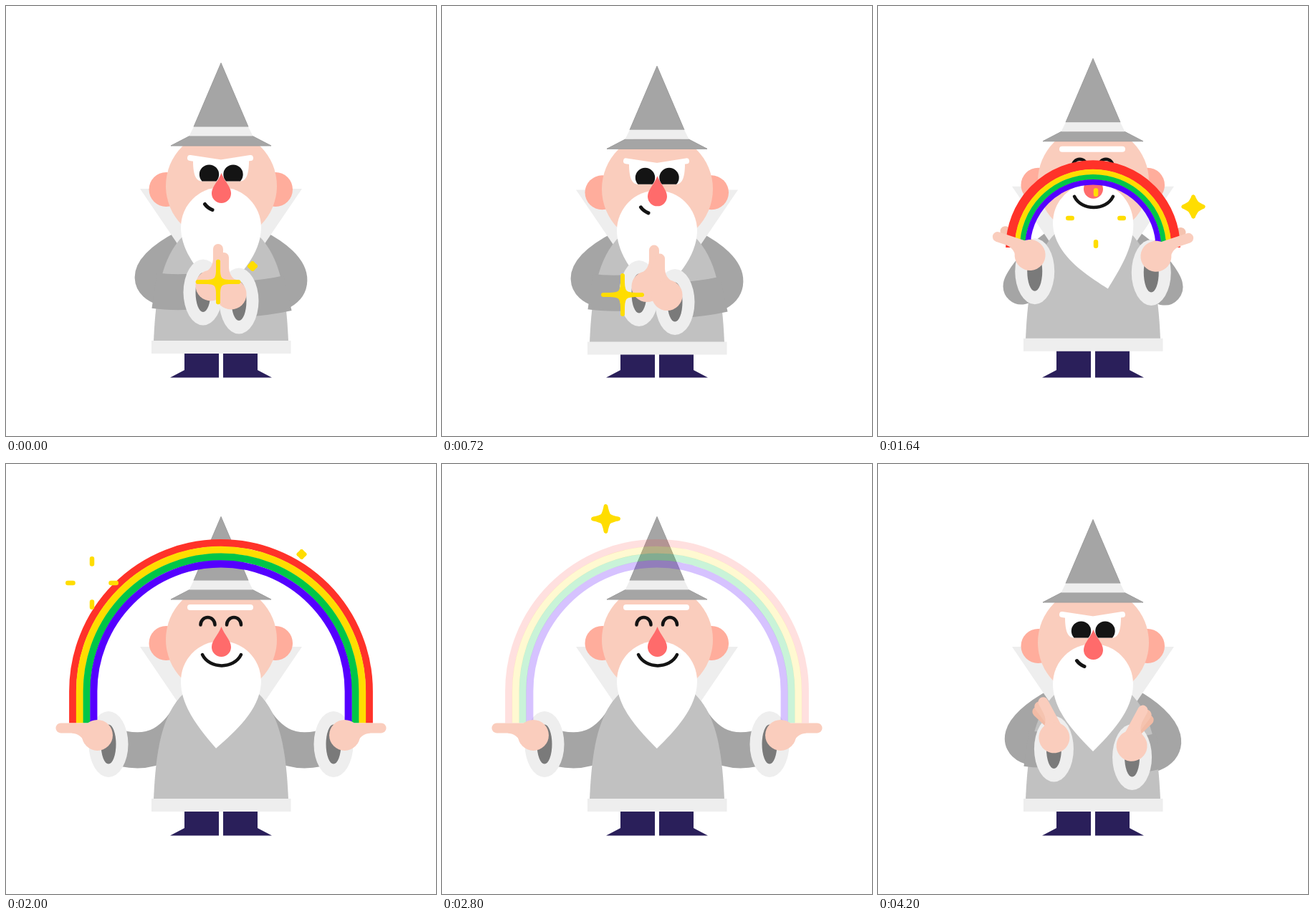
Write an HTML page that moves like this. It is 600 px wide and 600 px high and loops after 4.24 s.

```html
<!DOCTYPE html>
<html lang="en">
<head>
<meta charset="utf-8">
<title>Rainbow wizard</title>
<style>
  html, body { margin: 0; width: 100%; height: 100%; overflow: hidden; background: #fff; }
  svg { display: block; width: 100vw; height: 100vh; }
  .line { fill: none; stroke-linecap: round; stroke-linejoin: round; }
</style>
</head>
<body>
<svg viewBox="0 0 600 600">
  <g fill="#2a1f5a">
    <path d="M249 470H297V518.5H229L249 508Z"/>
    <path d="M351 470H303V518.5H371L351 508Z"/>
  </g>
  <g id="sleeves"></g>
  <g id="robe">
    <path fill="#eee" d="M187 255H413L360 333H240Z"/>
    <path fill="#c1c1c1" d="M206 468C209 400 217 350 248 320H352C383 350 391 400 394 468Z"/>
    <path fill="#eee" d="M203 467H397.5V485H203Z"/>
  </g>
  <g id="head">
    <circle cx="223.500" cy="250" r="24" fill="#ffad9c"/>
    <circle cx="376" cy="250" r="24" fill="#ffad9c"/>
    <circle cx="300.500" cy="245" r="77.500" fill="#facdbd"/>
    <path id="brow" class="line" stroke="#fff" stroke-width="8"/>
    <g id="sly">
      <path fill="#fff" d="M261 210C261 232 266 238.500 274 238.500H326C334 238.500 339 232 339 210L300 214Z"/>
      <path fill="#141414" d="M273.500 238.500A13.700 13.700 0 1 1 293.500 238.500ZM307 238.500A13.700 13.700 0 1 1 327 238.500Z"/>
    </g>
    <path id="beard" fill="#fff" d="M244 303A56 56 0 0 1 356 303C356 340 325 372 300 397C275 372 244 340 244 303Z"/>
    <path id="smirk" class="line" stroke="#141414" stroke-width="5" d="M277.500 270.500Q281 275.500 288 278.500"/>
    <g id="happy" class="line" stroke="#141414" stroke-width="4.500">
      <path d="M271.500 224.500A10 10.500 0 0 1 291.500 224.500M308 224.500A10 10.500 0 0 1 328 224.500"/>
      <path d="M274 266C284 286.500 318 286.500 328 266"/>
    </g>
    <path fill="#ff6b6b" d="M300.500 227C305 239 314 246 314 255.500A13.500 13.500 0 0 1 287 255.500C287 246 296 239 300.500 227Z"/>
    <g fill="#a5a5a5" stroke="#9c9c9c">
      <path d="M300 73.500L338 162.500H262Z"/>
      <path d="M256 175.500H344L370 189H230Z"/>
    </g>
    <path fill="#eee" d="M262 162.500H338L344.500 175.500H255.500Z"/>
  </g>
  <g id="forearms"></g>
  <g id="cuffs"></g>
  <g id="fingers"></g>
  <g id="rainbow" fill="none"></g>
  <g id="hands"></g>
  <g id="stars" class="line" stroke="#ffdd00"></g>
</svg>
<script>
const LOOP = 4240, STEP = 40;
const OPENING = 1440, OPENED = 1840, CLOSING = 3920;
const COLORS = ['#ff3229', '#ffdd00', '#00c648', '#5500ff'];

const $ = id => document.getElementById(id);
const clamp = v => Math.max(0, Math.min(1, v));
const lerp = (a, b, u) => a + (b - a) * u;
const part = (t, from, to) => clamp((t - from) / (to - from));
const smooth = u => u * u * (3 - 2 * u);
const ease = (t, from, to) => smooth(part(t, from, to));
const bump = (t, from, to) => Math.sin(Math.PI * part(t, from, to));

// Slow sinking, a crouch, then a hop
const robeY = t => 2.6 * part(t, 0, 1160) * (1 - ease(t, 1360, 1600))
  + 3.4 * bump(t, 1160, 1560) - 3.5 * bump(t, 1480, 1900);
const headY = t => (6 + 7 * part(t, 0, 1160)) * (1 - ease(t, 1360, 1640))
  + 5 * bump(t, 1160, 1500) - 1.5 * bump(t, 1620, 1960) + 6 * part(t, CLOSING, LOOP) ** 3;
const joy = t => ease(t, 1420, 1540) - ease(t, 3980, 4100);

// The beard swings like a damped pendulum
function beardAngle(t) {
  const age = Math.max(0, t - 1480);
  return -21 * Math.sin(2 * Math.PI * age / 680) * Math.exp(-age / 325);
}

// 0 = hands together, 1 = arms spread
const spreadAt = t => t < CLOSING
  ? smooth(part(t, OPENING, OPENED) ** 1.15)
  : 1 - part(t, CLOSING, LOOP) ** 1.9;

// One arm in left-hand coordinates; side 1 is mirrored
function arm(t, side) {
  const s = spreadAt(t), opening = t < CLOSING, arc = Math.sin(Math.PI * s);
  const lift = opening ? arc : 0;
  const rub = t < OPENING ? 5.5 * Math.sin(2 * Math.PI * t / 360) : 0;
  const lower = side ? 12 * (opening ? clamp(1 - 2 * s) : 1 - s * s) + rub : -rub;
  const x = lerp(275, 143, s), y = lerp(399.5, 391, s) - 23 * lift + lower;

  const wristAngle = (-41 - 100 * Math.sqrt(s)) * Math.PI / 180;
  const reach = 14.5 + 5.5 * s + 7 * lift;
  const palm = { x: x + reach * Math.cos(wristAngle), y: y + reach * Math.sin(wristAngle) };
  const turn = -90 * smooth(clamp(s / 0.6));
  const fan = 28 * arc * (opening ? 1 : -1);

  const wrap = body => `<g transform="translate(${side * 600} ${robeY(t)}) scale(${side ? -1 : 1} 1)">${body}</g>`;
  const sleeve = d => wrap(`<path class="line" style="stroke-linecap:butt" stroke="#a5a5a5" stroke-width="50" d="${d}"/>`);
  const finger = (angle, length, color) =>
    `<path class="line" transform="rotate(${angle})" stroke="${color}" stroke-width="14" d="M10 -8V${-length}"/>`;
  const hand = body => wrap(`<g transform="translate(${palm.x} ${palm.y}) rotate(${turn})">${body}</g>`);

  const bend = s * s;
  const upper = [lerp(195, 240, bend), lerp(365, 385, bend)];
  const elbow = [lerp(175, 205, bend), lerp(400, 415, bend) + 24 * lift + lower * 0.5];
  return {
    palm,
    sleeves: sleeve(`M${lerp(252, 264, bend)} 336C${upper} ${elbow} ${x} ${y}`),
    forearms: x > 232 ? sleeve(`M207 ${397 + lower * 0.3}Q235 ${401 + lower * 0.5} ${x} ${y - 2}`) : '',
    cuffs: wrap(`<ellipse cx="${x}" cy="${y}" rx="27.500" ry="46" fill="#eee"/>` +
      `<ellipse cx="${x}" cy="${y}" rx="10.500" ry="27.500" fill="#7a7a7a"/>`),
    fingers: arc > 0.02 ? hand(finger(fan, 42, '#f2bba5') + finger(fan / 2, 47, '#f5c3af')) : '',
    hands: hand(finger(0, 51, '#facdbd') +
      '<path fill="#facdbd" d="M3 -36Q2 -22 -12 -17H10Z"/><circle r="21.500" fill="#facdbd"/>')
  };
}

function rainbow(t, palm) {
  const s = spreadAt(t);
  if (s < 0.05 || t > CLOSING) return '';
  const q = part(s, 0.43, 1);
  const foot = palm.y + robeY(t) - 10.5 - 6.5 * q, top = foot - 44.5 * q;
  let r = 211.75 * s ** 0.65;
  const shrink = Math.min(1, r / 122);
  return COLORS.map((color, i) => {
    const w = lerp(i ? 7.2 : 12.5, 9.75, q) * shrink, m = r - w / 2;
    const faint = (0.15 + 0.03 * i) * (1 - 0.4 * ease(t, 2800, 3360));
    const alpha = lerp(faint, 1, (1 - part(t, 2300, 2800)) ** 1.5);
    r -= w;
    return `<path stroke="${color}" stroke-width="${w + 0.3}" opacity="${alpha}"` +
      ` d="M${300 - m} ${foot}V${top}A${m} ${m} 0 0 1 ${300 + m} ${top}V${foot}"/>`;
  }).join('');
}

// x, y, birth time
const STARS = [[296, 385, -240], [344, 363, -40], [252, 403, 490], [274, 350, 890], [304, 296, 1285],
  [440, 280, 1510], [120, 166, 1730], [412.5, 126, 1960], [228.5, 76.5, 2640]];

// A star grows, gets thinner and bursts into four dashes
function star([x, y, birth], t) {
  const age = t - birth, place = `transform="translate(${x} ${y})"`;
  if (age < 0 || age >= 440) return '';
  if (age <= 250) {
    const r = 1.5 + 27 * Math.min(1, age / 240) ** 1.3;
    const c = Math.min(r / 2, (28.5 - r) * 0.3);
    const quarter = angle => `<path transform="rotate(${angle})" fill="#ffdd00" stroke-width="5.500"` +
      ` d="M0 0V${-r}C${c} ${-c} ${c} ${-c} ${r} 0Z"/>`;
    return `<g ${place}>${[0, 90, 180, 270].map(quarter).join('')}</g>`;
  }
  const u = (age - 240) / 200, r = 28 + 14 * u, half = 3.7 - 3 * u * u;
  const a = r - half, b = r + half;
  return `<path ${place} stroke-width="6.500" d="M0 ${-a}V${-b}M0 ${a}V${b}M${-a} 0H${-b}M${a} 0H${b}"/>`;
}

function draw(t) {
  const arms = [arm(t, 0), arm(t, 1)], glad = joy(t);
  for (const id of ['sleeves', 'forearms', 'cuffs', 'fingers', 'hands']) {
    $(id).innerHTML = arms.map(a => a[id]).join('');
  }
  $('robe').setAttribute('transform', `translate(0 ${robeY(t)})`);
  $('head').setAttribute('transform', `translate(0 ${headY(t)})`);
  $('beard').setAttribute('transform', `rotate(${beardAngle(t)} 300 303)`);

  const end = lerp(206, 200, glad), dip = lerp(212.5, 200, glad);
  $('brow').setAttribute('d', `M257 ${end}L300 ${dip}L341 ${end}`);
  const show = (id, on) => $(id).setAttribute('visibility', on ? 'visible' : 'hidden');
  show('sly', glad < 0.5);
  show('smirk', glad < 0.5);
  show('happy', glad >= 0.5);

  $('rainbow').innerHTML = rainbow(t, arms[0].palm);
  $('stars').innerHTML = STARS.map(s => star(s, t)).join('');
}

const start = performance.now();
function frame(now) {
  const t = Math.max(0, now - start) % LOOP;
  draw(Math.floor(t / STEP) * STEP);
  requestAnimationFrame(frame);
}
draw(0);
requestAnimationFrame(frame);
</script>
</body>
</html>
```
